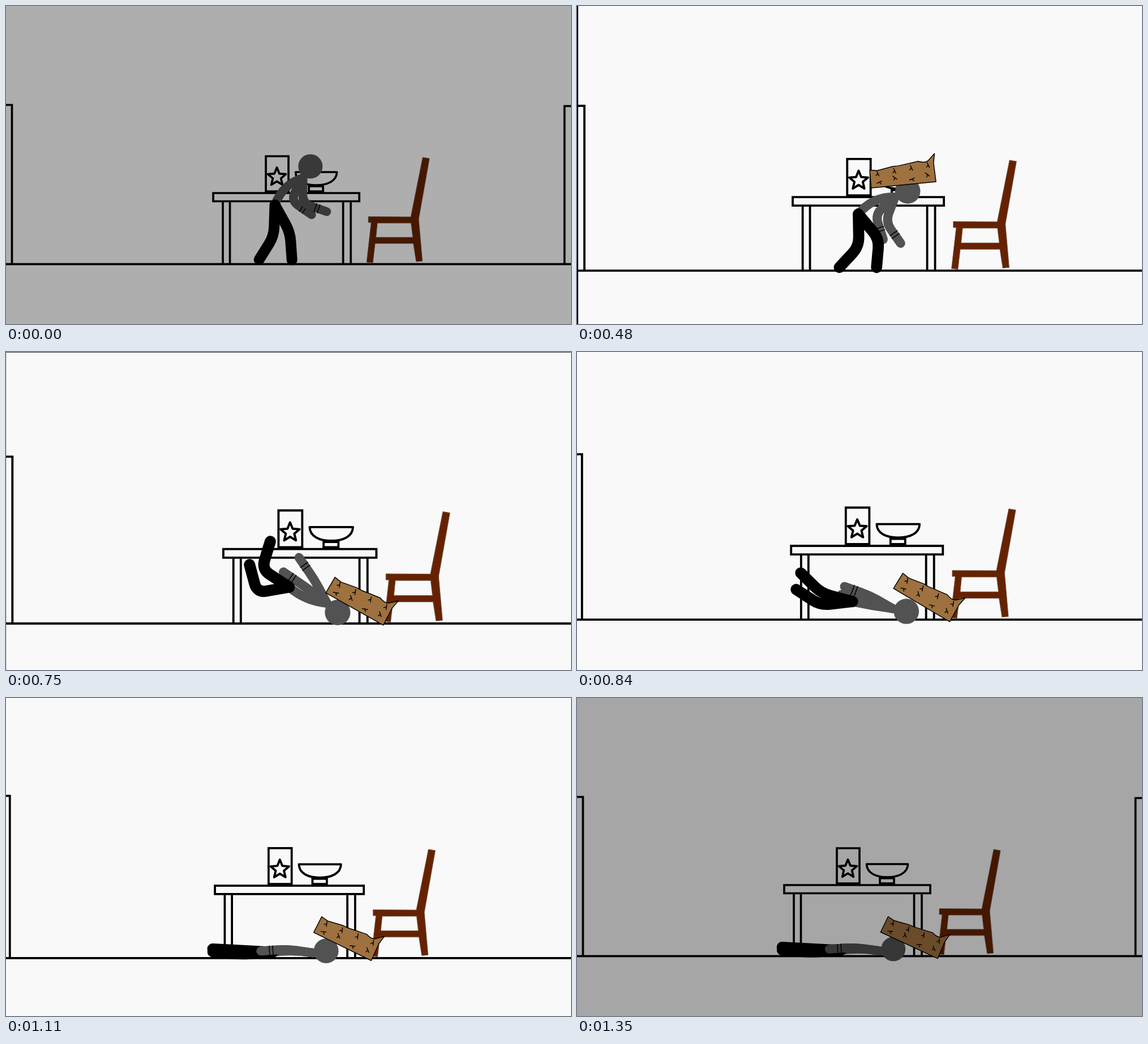
These frames come from a looping animation (998 by 561 pixels, 2100 ms). An HTML page with a canvas:

```html
<!DOCTYPE html>
<html>
<head>
<meta charset="utf-8">
<style>
  html, body { margin: 0; width: 100%; height: 100%; overflow: hidden; background: #f9f9f9; }
  canvas { display: block; }
</style>
</head>
<body>
<canvas id="stage" width="998" height="561"></canvas>
<script>
const ctx = document.getElementById('stage').getContext('2d');
const LOOP = 2100, STEP = 30;
const INK = '#000', SKIN = '#525252', PAPER = '#f9f9f9', LINE = 3.7;
const TORSO = 69, NECK = 24, HEAD = 21.5, ARM = [45, 45], LEG = [55, 49];

// Keys: a time, then the values there. Angles are in degrees, clockwise from the right.
const camera = [ // scale, x, y
  [150, 1, 0, 0], [270, 1.015, .2, .4], [480, 1.035, 2.2, -4.4], [750, 1.048, .3, 1.8],
  [960, 1.027, -5.3, -4.4], [1230, 1.0127, -2.8, -5.8], [1350, 1, 0, 0]
];
const logPath = [ // lower left corner, angle
  [270, 498, -60, -5.5], [480, 500, 314.4, -5.5], [750, 538.8, 403.8, 29.3],
  [960, 541.8, 400.5, 32.3], [1140, 536.3, 413, 24.8]
];
const poses = [ // hip, torso, head, arch, back arm, front arm, rear leg, front leg
  [420, 475, 351, -44, -57, 17, 119, 35, 91, 19, 92, 122, 61, 86],
  [480, 478, 359, -25, -25, 17, 139, 72, 111, 55, 89, 133, 50, 95],
  [750, 477, 394, 23, 41, -11, 217, 214, 242, 235, 170, 255, 213, 287],
  [900, 466, 445, 1, -8, 5, 188, 176, 188, 176, 176, 185, 183, 183]
];

function at(keys, t) {
  const next = keys.findIndex(k => k[0] > t);
  const b = keys.at(next), a = next > 0 ? keys[next - 1] : b;
  const p = a === b ? 0 : (t - a[0]) / (b[0] - a[0]);
  return a.slice(1).map((v, i) => v + (b[i + 1] - v) * p);
}

const polar = ([x, y], deg, d) => [x + d * Math.cos(deg * Math.PI / 180), y + d * Math.sin(deg * Math.PI / 180)];

function draw(d, width, stroke = INK, fill) {
  const path = new Path2D(d);
  if (fill) { ctx.fillStyle = fill; ctx.fill(path); }
  ctx.lineWidth = width;
  ctx.strokeStyle = stroke;
  ctx.stroke(path);
}

const starTips = Array.from({ length: 10 }, (_, i) => polar([478.5, 301.8], i * 36 - 90, i % 2 ? 7.5 : 16.8));

function drawRoom() {
  ctx.lineCap = 'butt';
  ctx.lineJoin = 'miter';
  draw('M-1.6 600V-2.5H1010', 3);
  draw('M-5 455.3H1010M-5 174.5H10.5V455M1010 176.5H986.5V455', LINE);
  for (const x of [383, 395.5, 595.5, 609]) draw(`M${x} 346V455`, LINE);
  draw('M366 330H624V344.5H366ZM459 265H499V327H459ZM535 318H560V327H535Z', LINE);
  ctx.lineJoin = 'round';
  draw('M' + starTips.join('L') + 'Z', 3.8);
  draw('M511.5 293H584.5C584 309 568 316 548 316S512 309 511.5 293Z', LINE);
  draw('M736 267L748 269L729 376L735.5 450L724.5 451L719.5 419H652L648 453L637 452L645 382H640V371.5L715 372Z' +
       'M656 383L653.5 408H718.5L715.5 383Z', .8, '#77665c', '#662200');
}

// Two bones with a rounded joint between them.
function limb(root, upper, lower, [a, b], width, color) {
  const soft = 16, joint = polar(root, upper, a), end = polar(joint, lower, b);
  ctx.lineCap = 'round';
  draw(`M${root}L${polar(joint, upper, -soft)}Q${joint} ${polar(joint, lower, soft)}L${end}`, width, color);
  return end;
}

function arm(shoulder, upper, lower) {
  const hand = limb(shoulder, upper, lower, ARM, 15.5, SKIN);
  ctx.lineCap = 'butt';
  for (const d of [15, 21]) {
    const wrist = polar(hand, lower, -d);
    draw(`M${polar(wrist, lower + 90, 8)}L${polar(wrist, lower - 90, 8)}`, 1.5);
  }
}

function drawFigure([x, y, torso, tilt, arch, back, backFore, front, frontFore, thigh1, shin1, thigh2, shin2]) {
  const hip = [x, y], neck = polar(hip, torso, TORSO), head = polar(neck, tilt, NECK);
  const spine = polar(polar(hip, torso, TORSO / 2), torso - 90, arch);
  arm(neck, back, backFore);
  ctx.lineCap = 'round';
  draw(`M${hip}Q${spine} ${neck}`, 15.5, SKIN);
  limb(hip, thigh1, shin1, LEG, 19, INK);
  limb(hip, thigh2, shin2, LEG, 19, INK);
  arm(neck, front, frontFore);
  ctx.fillStyle = SKIN;
  ctx.beginPath();
  ctx.arc(...head, HEAD, 0, 7);
  ctx.fill();
}

function twig(x, y, angle) {
  const root = [x, y], fork = polar(root, angle, 5);
  draw(`M${root}L${polar(root, angle, 10)}M${fork}L${polar(fork, angle + 70, 5)}`, 1.4);
}

function drawLog([x, y, angle]) {
  ctx.save();
  ctx.translate(x, y);
  ctx.rotate(angle * Math.PI / 180);
  draw('M0 0L.5 -30.5L13.5 -28.5L40 -33L49 -33L84 -37.5Q95 -33 101 -37L113 -48L110 -32L111 0Z', 1.4, INK, '#9e713f');
  for (let i = 0; i < 4; i++) {
    twig(12 + 29 * i, -28 - 2 * i, 70);
    twig(10 + 28 * i, i % 2 ? -17 : -7, i % 2 ? 42 : -18);
  }
  ctx.restore();
}

// Fades in from the dark, then out again.
const shade = t => Math.max(0, .3 - Math.max(0, t - 150) * .0022, (Math.min(t, 1350) - 1180) * .00196);

function render(now) {
  const t = Math.floor(now % LOOP / STEP) * STEP;
  const [scale, x, y] = at(camera, t);
  ctx.setTransform(1, 0, 0, 1, 0, 0);
  ctx.fillStyle = PAPER;
  ctx.fillRect(0, 0, 998, 561);
  ctx.setTransform(scale, 0, 0, scale, x, y);
  drawRoom();
  drawFigure(at(poses, t));
  if (t > 270) drawLog(at(logPath, t));
  ctx.setTransform(1, 0, 0, 1, 0, 0);
  ctx.fillStyle = `rgba(0,0,0,${shade(t)})`;
  ctx.fillRect(0, 0, 998, 561);
}

const start = performance.now();
function loop() {
  render(performance.now() - start);
  requestAnimationFrame(loop);
}
loop();
</script>
</body>
</html>
```
